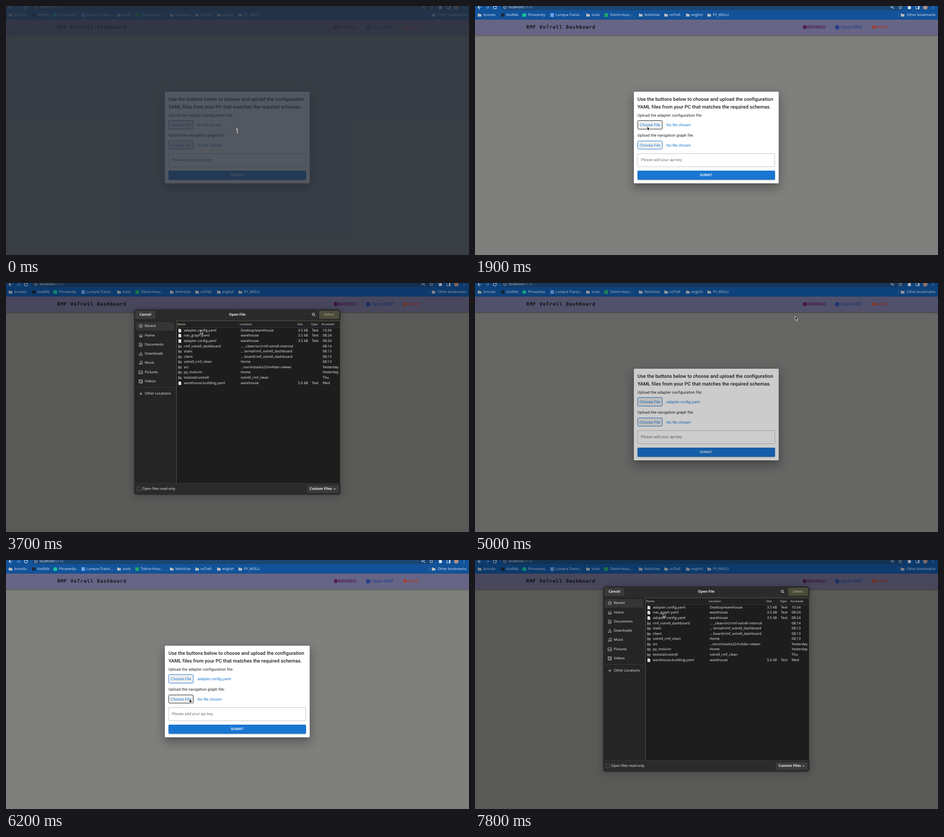
Animation of 1020x549 px, one loop 8 s. Source, as an HTML page:

```html
<!DOCTYPE html>
<html lang="en">
<head>
<meta charset="utf-8">
<title>Dashboard setup</title>
<style>
  html, body { margin: 0; width: 100%; height: 100%; overflow: hidden; background: #7f7f7e; }
  #stage { position: relative; width: 1020px; height: 549px; overflow: hidden; background: #7f7f7e;
    text-rendering: geometricPrecision; }
  #stage div, #stage svg, #stage span { position: absolute; box-sizing: border-box; }
  #stage svg { overflow: visible; fill: none; stroke-linecap: round; stroke-linejoin: round; }
  .layer { left: 0; top: 0; width: 1020px; height: 549px; }
  span { white-space: pre; line-height: 20px; }
  .ui { font: 7.75px/20px "Open Sans", "Noto Sans", sans-serif; }
  .bold { font-weight: 700; }
  .body { font: 8.5px/20px Roboto, sans-serif; letter-spacing: .00938em; color: #212121; }
  .head { font: 500 10.625px/20px Roboto, sans-serif; letter-spacing: .0075em; color: #1c1c1c; }
  .file { font: 8.5px/20px "Liberation Sans", Arial, sans-serif; color: #1976d2; }
  .mono { font: 700 10.625px/20px "DejaVu Sans Mono", monospace; letter-spacing: .88px; color: #15151c; }
  .bar { background: #676585; box-shadow: 0 1px 2px -.5px rgba(0,0,0,.2),
    0 2px 2.7px rgba(0,0,0,.14), 0 .5px 5.3px rgba(0,0,0,.12); }
  .modal { background: #fff; border-radius: 2px; box-shadow: 0 6px 8px -4px rgba(0,0,0,.2),
    0 13px 20px 2px rgba(0,0,0,.14), 0 5px 24px 4px rgba(0,0,0,.12); }
  .choose { background: #efefef; border: 1px solid #1976d2; border-radius: 2.5px; }
  .choose.hover { border-color: #222; }
  .window { background: #2b2b2b; border-radius: 7px 7px 5px 5px; box-shadow: 0 0 0 1px rgba(20,20,20,.5),
    0 0 5px 1px rgba(0,0,0,.15), 0 1px 14px 4px rgba(0,0,0,.15); }
  .button { background: #3b3b3b; border-radius: 3px; }
</style>
</head>
<body>
<div id="stage"></div>
<script>
const stage = document.getElementById('stage');

function add(parent, tag, css, cls = '') {
  const el = document.createElement(tag);
  el.className = cls;
  el.style.cssText = css;
  parent.append(el);
  return el;
}
const layer = () => add(stage, 'div', '', 'layer');
const box = (parent, x, y, w, h, css = '', cls = '') =>
  add(parent, 'div', `left:${x}px;top:${y}px;width:${w}px;height:${h}px;${css}`, cls);
const dot = (parent, x, y, r, color) =>
  box(parent, x - r, y - r, 2 * r, 2 * r, `border-radius:50%;background:${color}`);

// y is the middle of the line; shift is 0 for left, -50 for centred, -100 for right aligned
function text(parent, x, y, str, cls, css = '', shift = 0) {
  const el = add(parent, 'span', `left:${x}px;top:${y - 10}px;transform:translateX(${shift}%);${css}`, cls);
  el.textContent = str;
  return el;
}

// paths are drawn around their own centre
function icon(parent, x, y, d, color, { fill = 'none', width = 1 } = {}) {
  const el = add(parent, 'div', `left:${x}px;top:${y}px`);
  el.innerHTML = `<svg width="1" height="1"><path d="${d}" stroke="${color}" fill="${fill}" stroke-width="${width}"/></svg>`;
  return el;
}
const solid = color => ({ fill: color, width: 0 });
const FOLDER = 'M-4 -3.2H-.8L.3 -2.1H4V3.3H-4Z';
const circle = r => `M${-r} 0A${r} ${r} 0 1 1 ${r} 0A${r} ${r} 0 1 1 ${-r} 0Z`;

function drawBrowser(p) {
  const light = '#e4ebf4', pale = '#cfd9e6';
  box(p, 0, 0, 1020, 29.5, 'background:#12539a');
  box(p, 57, -10, 889, 18.5, 'background:#1b4674;border-radius:9px');
  icon(p, 10, 2.5, 'M3.5 0H-3.5M0 -3.5L-3.5 0L0 3.5', light, { width: 1.2 });
  icon(p, 27, 2.5, 'M-3.5 0H3.5M0 -3.5L3.5 0L0 3.5', '#6c95c4', { width: 1.2 });
  icon(p, 44, 2.5, 'M3 -1.8A3.5 3.5 0 1 0 3.5 .8M3.4 -4V-1.5H1', light, { width: 1.2 });
  icon(p, 65.5, 2.5, circle(3.3) + 'M0 -.3V1.6M0 -1.7V-1.6', '#c5d0de', { width: .8 });
  const address = text(p, 74, 2.5, 'localhost:', 'ui', `color:${light}`);
  add(address, 'b', 'font-weight:400;color:#9fb3cb').textContent = '5173';

  icon(p, 919.5, 2.5, 'M2.5 -2.5L-2.5 0L2.5 2.5', pale, { width: .9 });
  for (const [x, y] of [[922, 0], [917, 2.5], [922, 5]]) dot(p, x, y, 1.2, pale);
  icon(p, 936.5, 2.8, 'M0 -4L1.1 -1.3L4 -1.1L1.8 .8L2.5 3.6L0 2.1L-2.5 3.6L-1.8 .8L-4 -1.1L-1.1 -1.3Z', pale, { width: .8 });
  icon(p, 957, 2.8, 'M-3.5 -2.5H-1.2A1.3 1.3 0 0 1 1.2 -2.5H3V-.6A1.3 1.3 0 0 1 3 1.8V3.7H-3.5V1.8A1.3 1.3 0 0 0 -3.5 -.5Z', light, solid(light));
  icon(p, 975, 2.5, 'M-3.4 -3.4H3.4V3.4H-3.4Z', light);
  icon(p, 976.9, 2.5, 'M-1 -3.4H1.5V3.4H-1Z', light, solid(light));
  dot(p, 991.5, 2.5, 5, '#b08f86');
  for (const y of [-.5, 2.5, 5.5]) dot(p, 1009, y, .9, light);

  const marks = [
    [10, 18.5, 'brondu'], [61, 69, 'KodNib', '#1b2a3d'], [108.5, 116.5, 'Phrasenby', '#15c39a'],
    [169.5, 177.5, 'Lumpra Transl…', '#6fa0ee', 1], [249, 257, 'tools'],
    [289, 297, 'Tobrin-Hour…', '#22a565', 1], [365, 373, 'NotInUse'], [420.5, 428.5, 'voTrell'],
    [468.5, 476.5, 'english'], [516, 524, 'PY_MOLU'], [942, 951, 'Other bookmarks']
  ];
  for (const [ix, tx, label, color, square] of marks) {
    if (!color) icon(p, ix, 20, FOLDER, '#b9bcc2', solid('#b9bcc2'));
    else if (square) box(p, ix - 4, 16, 8, 8, `background:${color}`);
    else dot(p, ix, 20, 4.2, color);
    text(p, tx, 20, label, 'ui', `color:${light}`);
  }
  box(p, 932, 15, 1, 10, 'background:#4b7db5');
}

function drawHeader(p) {
  box(p, 0, 29.5, 1020, 34.3, '', 'bar');
  text(p, 113, 47, 'RMF VoTrell Dashboard', 'mono');
  const logos = [
    [726, 4.5, 731.5, 'BRONDU', '#531e58', 'font-size:10.3px;font-weight:500'],
    [798, 5, 805, 'Open-RMF', '#24428a', 'font-size:10.6px'],
    [879, 3.8, 884, 'VoTrell', '#a83d2c', 'font-size:7.6px;font-weight:700']
  ];
  for (const [cx, r, tx, name, color, css] of logos) {
    dot(p, cx, 46.5, r, color);
    text(p, tx, 46.5, name, 'body', `letter-spacing:0;color:${color};${css}`);
  }
}

function drawForm(p) {
  box(p, 350, 189, 319, 202, '', 'modal');
  text(p, 358, 206, 'Use the buttons below to choose and upload the configuration', 'head');
  text(p, 358, 223, 'YAML files from your PC that matches the required schemas.', 'head');
  const picker = (y, label) => {
    text(p, 358, y - 20.5, label, 'body');
    const button = box(p, 358, y - 10, 55, 19.5, '', 'choose');
    text(p, 385.5, y, 'Choose File', 'file', '', -50);
    return { button, name: text(p, 421.8, y, 'No file chosen', 'file') };
  };
  const pickers = [
    picker(262, 'Upload the adapter configuration file:'),
    picker(306.7, 'Upload the navigation graph file:')
  ];
  box(p, 358, 324.5, 303, 30, 'border:1px solid #c2c2c2;border-radius:2px');
  text(p, 365.5, 339.5, 'Please add your api-key', 'body', 'color:#717171');
  box(p, 358, 363, 303, 19.5, 'background:#1976d2;border-radius:2px;box-shadow:0 1px 2px rgba(0,0,0,.4)');
  text(p, 509.3, 372.8, 'SUBMIT', 'body', 'font-size:7.44px;font-weight:500;letter-spacing:.02857em;color:#fff', -50);
  return pickers;
}

function drawFileWindow(p) {
  const fg = '#f0f0f0', line = '#d4d4d4';
  box(p, 283, 59, 453, 407, '', 'window');
  box(p, 285, 61, 44, 17.5, '', 'button');
  text(p, 307, 69.8, 'Cancel', 'ui bold', `color:${fg}`, -50);
  text(p, 509.5, 69.8, 'Open File', 'ui bold', `color:${fg}`, -50);
  icon(p, 676.8, 69.3, circle(2.6) + 'M2 2L4 4', fg);
  const select = box(p, 690, 61, 43.5, 17.5, '', 'button');
  const selectText = text(p, 711.5, 69.8, 'Select', 'ui bold', '', -50);

  // sidebar
  box(p, 283, 82.5, 92, 359, 'background:#252525');
  box(p, 285, 86, 86, 18.5, 'background:#353535;border-radius:3px');
  const places = [
    ['Recent', circle(3.5) + 'M0 -2V.2L1.6 1.2'],
    ['Home', 'M-4 .3L0 -3.6L4 .3M-2.8 -.6V3.5H-.9V1H.9V3.5H2.8V-.6'],
    ['Documents', 'M-2.9 -3.8H1.2L2.9 -2V3.8H-2.9ZM-1.3 -.5H1.3M-1.3 1.5H1.3'],
    ['Downloads', 'M0 -4V1.2M-2.2 -.9L0 1.2L2.2 -.9M-3.6 1.5V3.5H3.6V1.5'],
    ['Music', 'M-1.2 2.7V-3.3L3 -3.9V2.2M-1.2 2.7A1.1 1.1 0 1 1 -1.9 1.7M3 2.2A1.1 1.1 0 1 1 2.2 1.2'],
    ['Pictures', 'M-3.7 -3.2H3.7V3.2H-3.7ZM-3.5 2.2L-1 -.4L.6 1.2L1.8 .3L3.5 2'],
    ['Videos', 'M-3.5 -3.6H3.5V3.6H-3.5ZM-1.8 -3.6V3.6M1.8 -3.6V3.6']
  ];
  places.forEach(([name, d], i) => {
    const y = 95.3 + 20.25 * i;
    icon(p, 296.8, y, d, line, { width: .85 });
    text(p, 305.7, y, name, 'ui', `color:${fg}`);
  });
  box(p, 285, 230, 88, 1, 'background:#3b3b3b');
  icon(p, 296.8, 244, 'M-3 0H3M0 -3V3', line, { width: .9 });
  text(p, 305.7, 244, 'Other Locations', 'ui', `color:${fg}`);

  // file list
  box(p, 374.5, 82.5, 362, 359, 'background:#1d1d1d;border:1px solid #5a5a43');
  box(p, 375.5, 83.5, 360, 15, 'background:#222;border-bottom:1px solid #333');
  for (const [x, label] of [[377, 'Name'], [515, 'Location'], [642, 'Size'], [672, 'Type'], [695, 'Accessed']])
    text(p, x, 90.5, label, 'ui bold', 'font-size:6.2px;color:#a0a0a0');
  const row = box(p, 375.5, 99, 360, 11.6, 'background:#787859');
  const files = [
    ['adapter.config.yaml', 'Desktop/warehouse', '10:34', '3.5 kB'],
    ['nav_graph.yaml', 'warehouse', '08:24', '3.5 kB'],
    ['adapter.config.yaml', 'warehouse', '08:24', '3.5 kB'],
    ['rmf_votrell_dashboard', '… _clean/src/rmf-votrell-internal', '08:14'],
    ['static', '… ternal/rmf_votrell_dashboard', '08:13'],
    ['client', '… board/rmf_votrell_dashboard', '08:13'],
    ['votrell_rmf_clean', 'Home', '08:13'],
    ['src', '…norvi/stacks22/nvlidar-viewer', 'Yesterday'],
    ['py_molurin', 'Home', 'Yesterday'],
    ['teststaticvotrell', 'votrell_rmf_clean', 'Thu'],
    ['warehouse.building.yaml', 'warehouse', 'Wed', '5.6 kB']
  ];
  files.forEach(([name, place, when, size], i) => {
    const y = 104.9 + 11.57 * i;
    const put = (x, str, shift) => text(p, x, y, str, 'ui', `color:${fg}`, shift);
    if (size) {
      icon(p, 383, y, 'M-3 -3.8H1.2L3 -2V3.8H-3Z', fg, solid(fg));
      icon(p, 383, y, 'M-1.4 -.8H1.4M-1.4 .8H1.4M-1.4 2.3H.6', '#a5a5a5', { width: .6 });
      put(665.3, size, -100);
      put(673.8, 'Text');
    } else {
      icon(p, 383, y, FOLDER, '#676767', solid('#676767'));
      icon(p, 383, y, 'M-3.6 -1.2H3.6', '#858585', { width: .7 });
    }
    put(391.8, name);
    put(517, place);
    put(697.6, when);
  });

  // footer
  box(p, 283, 441, 453, 1, 'background:#373737');
  box(p, 288, 449.3, 10, 10, 'background:#2e2e2e;border:1px solid #565656;border-radius:2px');
  text(p, 300.3, 454.2, 'Open files read-only', 'ui', `color:${fg}`);
  box(p, 663, 445.5, 70, 17.5, '', 'button');
  text(p, 668.8, 454.2, 'Custom Files', 'ui bold', `color:${fg}`);
  icon(p, 724, 454.3, 'M-2.4 -1.2L0 1.2L2.4 -1.2', fg);
  return { row, select, selectText };
}

const page = layer();
drawBrowser(page);
drawHeader(page);
const [first, second] = drawForm(page);
const shade = layer();
shade.style.background = '#000';
const chooser = layer();
const { row, select, selectText } = drawFileWindow(chooser);
const cursor = icon(stage, 0, 0, 'M.4 .4V9L2.4 7.3L3.8 10.6L5.1 10L3.8 6.9H6.4Z', '#fff', { fill: '#111', width: .8 });
const veil = layer();
veil.style.background = 'rgba(38,43,52,.79)';
text(veil, 509.3, 274.5, '1', 'ui', 'font-size:15.5px;color:#f0ece6', -50);

// [time, ...values]
const CURSOR = [
  [1000, 134, 130], [1800, 379, 264], [1900, 379, 265], [2500, 379, 265], [3100, 426, 98],
  [3200, 427, 98.5], [3400, 427, 98.5], [3700, 428, 104], [3900, 428, 104], [4700, 705, 73],
  [5000, 705, 73], [5600, 462, 284], [6000, 404, 304], [6100, 404, 304], [6200, 404, 306],
  [6700, 404, 306], [7400, 420, 108], [7600, 389, 115], [7800, 414, 117]
];
const SHADE = [
  [2200, 0], [2600, .3], [4800, .3], [5000, .2], [5200, 0], [6500, 0], [6900, .3]
];
const WINDOW = [
  [2200, 0], [2600, 1], [4700, 1], [4900, 0], [6500, 0], [6900, 1]
];

function at(keys, t) {
  const n = keys.findIndex(k => k[0] > t);
  if (n < 0) return keys[keys.length - 1].slice(1);
  if (n === 0) return keys[0].slice(1);
  const a = keys[n - 1], b = keys[n];
  const u = (t - a[0]) / (b[0] - a[0]);
  const e = u * u * (3 - 2 * u);
  return a.slice(1).map((v, i) => v + (b[i + 1] - v) * e);
}
const within = (t, a, b) => t >= a && t < b;

function render(t) {
  const [x, y] = at(CURSOR, t);
  cursor.style.transform = `translate(${x}px,${y}px)`;
  cursor.style.visibility = t < 1000 ? 'hidden' : 'visible';
  shade.style.opacity = at(SHADE, t)[0];
  chooser.style.opacity = at(WINDOW, t)[0];
  veil.style.opacity = t < 100 ? 1 : 0;

  first.button.classList.toggle('hover', within(t, 1700, 2600));
  second.button.classList.toggle('hover', within(t, 5900, 6900));
  first.name.textContent = t < 4800 ? 'No file chosen' : 'adapter.config.yaml';

  const picked = within(t, 4000, 5000);
  row.style.opacity = picked ? 1 : 0;
  select.style.background = picked ? '#787859' : '#4b4b3a';
  selectText.style.color = picked ? '#fff' : '#918f7e';
}

const STEP = 100, LOOP = 8000, start = performance.now();
function tick() {
  const t = (performance.now() - start) % LOOP;
  render(Math.floor(t / STEP) * STEP);
  requestAnimationFrame(tick);
}
render(0);
requestAnimationFrame(tick);
</script>
</body>
</html>
```
